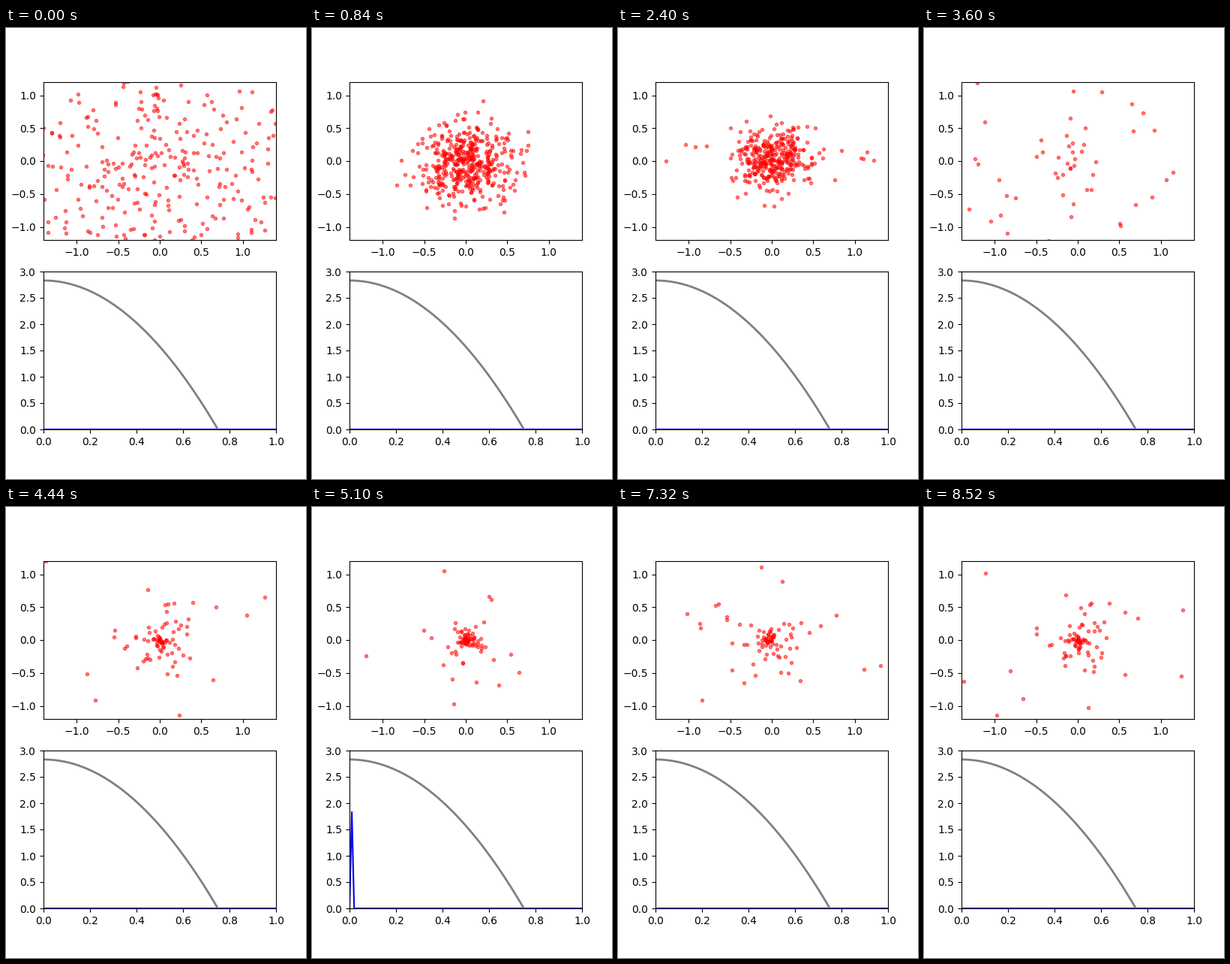
Write a matplotlib script that moves like this. It is 400x600 px and loops after 8.58 s.

```python
import numpy as np
import matplotlib.pyplot as plt
from matplotlib.animation import FuncAnimation

FRAMES, STEP = 143, 60
ATOMS, KEPT, EARLY = 450, 110, 140
OMEGA = 2 * np.pi / 67
FLASHES = {18, 52, 85, 120}

# Cloud size over time, interpolated on a log scale
SIZE_T = [0, 14, 40, 46, 60, 85, 103, 119, 122, 133, 142]
SIZE = [1.15, 0.28, 0.23, 0.25, 1.8, 0.08, 0.45, 0.15, 0.28, 0.5, 0.28]

rng = np.random.default_rng(7)
start, swing = rng.normal(size=(2, ATOMS, 2))
spread = np.exp(1.8 * rng.normal(size=ATOMS))
side = rng.choice([-1, 1], ATOMS)

# Most atoms leave the trap sideways, the rest stay for good
leave = np.full(ATOMS, np.inf)
leave[KEPT:KEPT + EARLY] = rng.uniform(10, 40, EARLY)
leave[KEPT + EARLY:] = rng.uniform(41, 50, ATOMS - KEPT - EARLY)


def cloud(t):
    size = np.exp(np.interp(t, SIZE_T, np.log(SIZE)))
    phase = OMEGA * t
    pos = size * (start * np.cos(phase) + swing * np.sin(phase))
    mix = np.clip((t - 44) / 12, 0, 1)
    pos[:KEPT] *= spread[:KEPT, None] ** mix
    pos[:, 0] += side * 0.025 * np.maximum(t - leave, 0) ** 2
    return pos


def density(t):
    y = np.zeros_like(grid)
    if t in FLASHES:
        y[1] = 1.83
    return y


fig, (top, low) = plt.subplots(2, 1, figsize=(4, 6), dpi=100)
top.set(xlim=(-1.4, 1.4), ylim=(-1.2, 1.2))
dots, = top.plot([], [], "r.", alpha=0.5)

grid = np.linspace(0, 1, 101)
low.set(xlim=(0, 1), ylim=(0, 3))
spike, = low.plot(grid, 0 * grid, color="blue", lw=1.5)
low.plot(grid, 2.83 * (1 - (grid / 0.75) ** 2), color="gray", lw=2)


def draw(t):
    dots.set_data(*cloud(t).T)
    spike.set_ydata(density(t))
    return dots, spike


anim = FuncAnimation(fig, draw, frames=FRAMES, interval=STEP,
                     repeat=True, repeat_delay=0)
plt.show()
```
